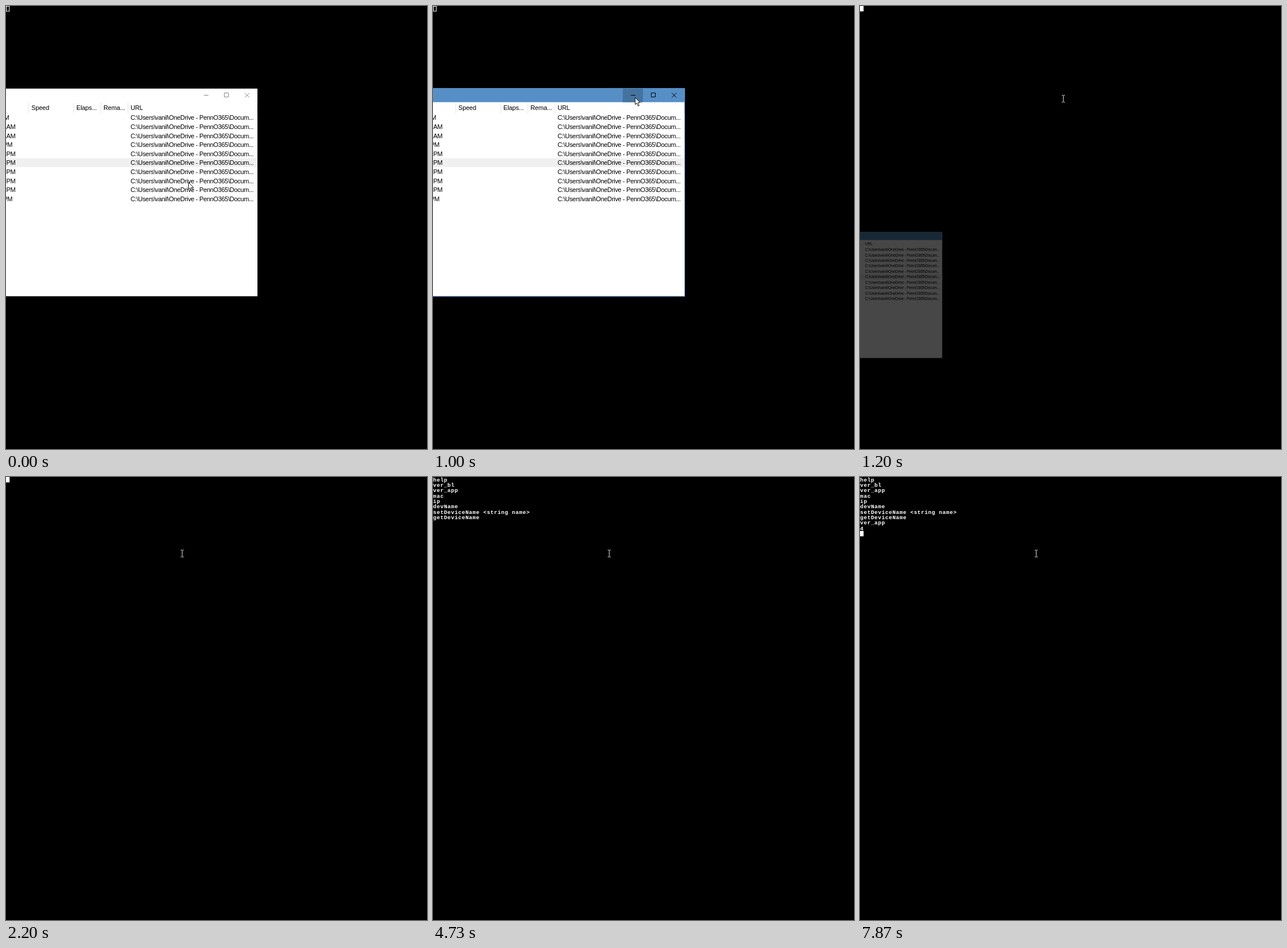
Animation, 730 px wide and 767 px high, one loop 8 s. Source, as an HTML page:

```html
<!DOCTYPE html>
<html lang="en">
<head>
<meta charset="utf-8">
<title>Terminal</title>
<style>
  html, body { margin: 0; width: 100%; height: 100%; overflow: hidden; background: #000; }
  svg { display: block; width: 730px; height: 767px; }
  #list { font: 11px "Liberation Sans", Arial, sans-serif; letter-spacing: -.33px; fill: #000; }
  #head { letter-spacing: -.15px; }
  #term, #under { font: bold 9.4px "Liberation Mono", "Courier New", monospace; letter-spacing: .58px; }
  #term { fill: #fff; }
  #icons { fill: none; }
</style>
</head>
<body>
<svg viewBox="0 0 730 767">
  <g id="term"></g>
  <rect id="caret"/>
  <text id="under"/>
  <g id="win">
    <rect x="-600" y="143" width="1036" height="359.5" fill="#fff"/>
    <rect id="bar" x="-600" y="143" width="1036" height="23.5"/>
    <rect id="hover" x="329" y="143" width="35" height="23.5"/>
    <path id="icons" d="M343 154.5h8M378.5 150.5h7v7h-7zM414 150.5l8 8m0-8l-8 8"/>
    <path d="M39.5 167v19M117.5 167v19M164.5 167v19M211.5 167v19M435.5 167v19" stroke="#e5e5e5"/>
    <rect x="-600" y="263.5" width="1036" height="15.5" fill="#f0f0f0"/>
    <g id="list"><g id="head"></g></g>
    <path id="edge" d="M-600 142.5H436.5V503H-600" fill="none" stroke="#4f87bd"/>
  </g>
  <path id="arrow" d="M.5.5V12.6L3.3 10 5.4 15.2 7.5 14.3 5.3 9.3H9.2z" fill="#fff" stroke="#000" stroke-width=".9"/>
  <path id="beam" d="M-2.5-5.5H-.5M.5-5.5H2.5M0-5V6M-2.5 6.5H-.5M.5 6.5H2.5" fill="none" stroke="#ddd"/>
</svg>
<script>
const $ = id => document.getElementById(id);
const set = (el, attrs) => { for (const k in attrs) el.setAttribute(k, attrs[k]); };
const show = (el, on) => { el.style.display = on ? "" : "none"; };
const LOOP = 8000, TICK = 1000 / 15, CELL = 6.22, LINE = 9.33, INSET = .3, BASE = 7.7;

function addText(parent, str, x, y, attrs = {}) {
  const el = document.createElementNS("http://www.w3.org/2000/svg", "text");
  set(el, { x, y, ...attrs });
  el.textContent = str;
  parent.append(el);
}

// Download list
[["Speed", 44], ["Elaps...", 122], ["Rema...", 169], ["URL", 216]]
  .forEach(([label, x]) => addText($("head"), label, x, 180.3));
const halves = ["AM", "AM", "AM", "PM", "PM", "PM", "PM", "PM", "PM", "PM"];
halves.forEach((half, i) => {
  const y = 197.4 + i * 15.6;
  const end = i === 0 ? 5.3 : i === 3 || i === 9 ? 11 : 16.3;
  addText($("list"), half, end, y, { "text-anchor": "end" });
  addText($("list"), "C:\\Users\\vanil\\OneDrive - PennO365\\Docum...", 216, y);
});

// Terminal states: time, text, caret mode ("cr" = back at column 0)
const menu = "help\nver_bl\nver_app\nmac\nip\ndevName\nsetDeviceName <string name>\ngetDeviceName\n";
const states = [
  [0, "", "hollow"], [1130, ""], [1670, "", "off"], [2200, ""], [2730, "", "off"], [3270, ""],
  [3330, "h"], [3530, "he"], [3670, "hel"], [3870, "help"], [4130, "help", "cr"],
  [4200, menu], [4730, menu, "off"], [5270, menu], [5730, menu, "off"],
  [5930, menu + "v"], [6070, menu + "ve"], [6200, menu + "ver"], [6670, menu + "ver", "off"],
  [6930, menu + "ver_"], [7200, menu + "ver_a"], [7330, menu + "ver_ap"],
  [7470, menu + "ver_app"], [7600, menu + "ver_app", "cr"], [7870, menu + "ver_app\n4\n"]
];
let current;

function drawTerminal(t) {
  const state = states.findLast(s => s[0] <= t);
  if (state === current) return;
  current = state;
  const [, text, mode = "on"] = state;
  const lines = text.split("\n"), row = lines.length - 1;
  const col = mode === "cr" ? 0 : lines[row].length;
  const x = col * CELL, y = row * LINE;
  $("term").replaceChildren();
  lines.forEach((line, i) => addText($("term"), line, INSET, i * LINE + BASE));
  show($("caret"), mode !== "off");
  set($("caret"), mode === "hollow"
    ? { x: .5, y: .5, width: 5.2, height: 8.5, fill: "none", stroke: "#fff" }
    : { x, y, width: CELL, height: LINE, fill: "#fff", stroke: "none" });
  set($("under"), { x: x + INSET, y: y + BASE });
  $("under").textContent = mode === "cr" ? lines[row][0] : "";
}

function drawWindow(t) {
  const shrinking = t >= 1130, active = t >= 1000, hot = t >= 800 && !shrinking;
  const [scale, x, y, alpha] = t < 1130 ? [1, 0, 0, 1]
    : t < 1200 ? [.889, -35, 86.4, .785] : [.608, -122.6, 304, .28];
  show($("win"), t < 1270);
  set($("win"), { transform: `translate(${x} ${y}) scale(${scale})`, opacity: alpha });
  set($("bar"), { fill: active ? "#568fc6" : "#fff" });
  set($("hover"), { fill: active ? "#4573a0" : "#e5e5e5" });
  set($("icons"), { stroke: active ? "#000" : "#888" });
  show($("hover"), hot);
  show($("icons"), !shrinking);
  show($("edge"), active && !shrinking);
}

// Pointer: eased moves, counted in ticks
const glide = (n, from, to, a, b) => {
  const p = Math.min(1, Math.max(0, (n - from) / (to - from)));
  const e = p * p * (3 - 2 * p);
  return a.map((v, i) => Math.round(v + (b[i] - v) * e));
};

function drawPointer(t) {
  const n = Math.floor((t + 5) / TICK), overWindow = t < 1130;
  show($("arrow"), overWindow);
  show($("beam"), !overWindow);
  const [x, y] = !overWindow ? glide(n, 18, 21, [352, 160], [305, 132])
    : n < 9 ? glide(n, 0, 7, [316, 305], [357, 180])
    : glide(n, 9, 14, [357, 180], [350, 158]);
  const half = overWindow ? 0 : .5;
  set($(overWindow ? "arrow" : "beam"), { transform: `translate(${x + half} ${y})` });
}

function frame() {
  const t = performance.now() % LOOP;
  drawTerminal(t);
  drawWindow(t);
  drawPointer(t);
  requestAnimationFrame(frame);
}
frame();
</script>
</body>
</html>
```
